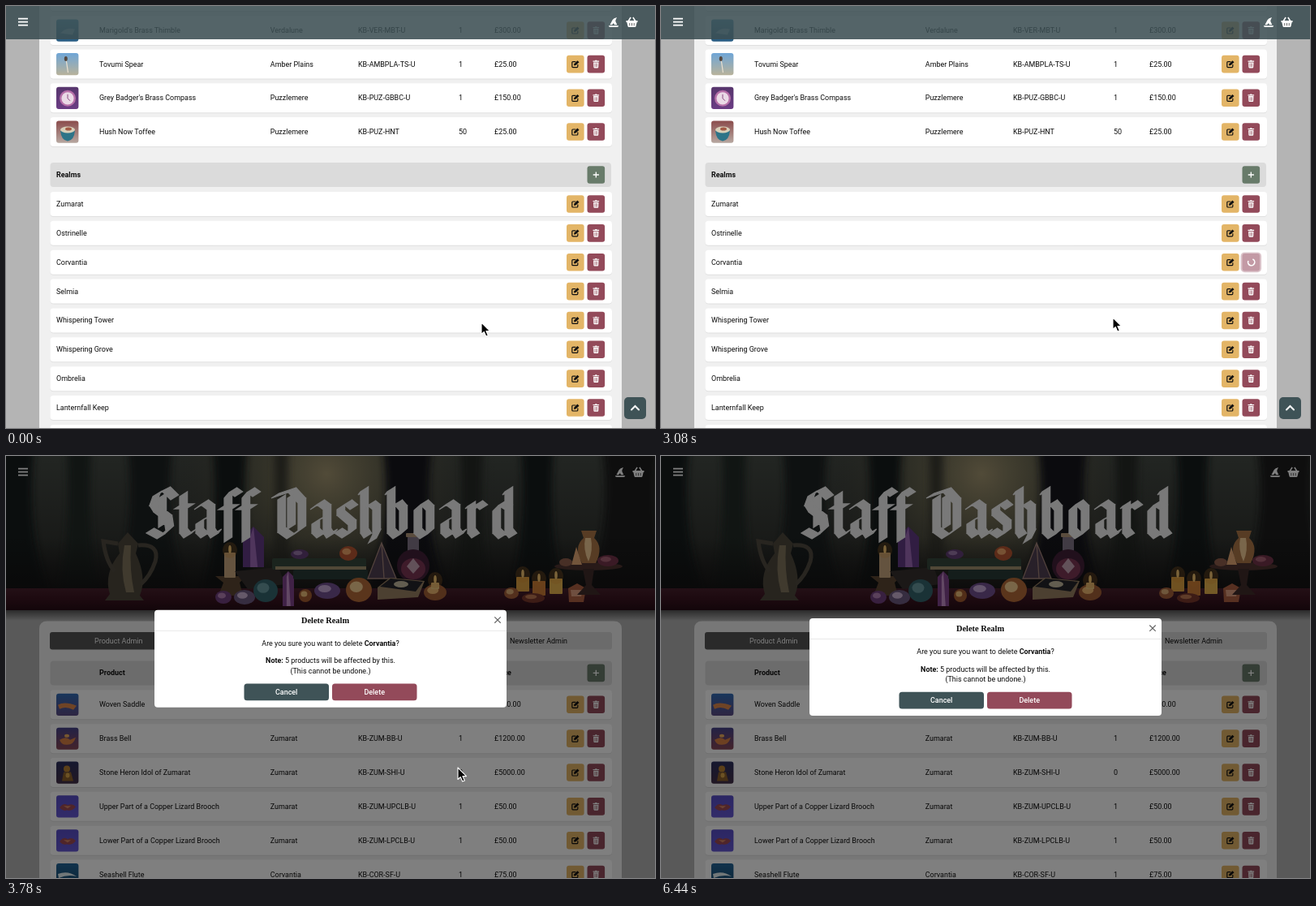
These frames come from a looping animation (800 px wide and 520 px high, 6.65 s). An HTML page:

```html
<!DOCTYPE html>
<html lang="en">
<head>
<meta charset="utf-8">
<title>Delete realm</title>
<style>
html, body { margin: 0; width: 100%; height: 100%; overflow: hidden; background: #b4b4b4; }
svg { display: block; width: 100vw; height: 100vh; }
text { font-family: Roboto, Inter, sans-serif; font-size: 8.95px; fill: #0c0c0c; }
.b { font-weight: 700; }
.m { font-weight: 500; }
.c { text-anchor: middle; }
.w { fill: #fff; }
.h { font-family: "Liberation Serif", serif; font-weight: 700; font-size: 10.4px; }
.url { font-family: Inter, sans-serif; font-size: 13px; fill: #6d727c; }
</style>
</head>
<body>
<svg id="stage" viewBox="0 0 800 520"></svg>
<script>
const LOOP = 6650, STEP = 70;
const HOVER = 1050, CLICK = 1810, RELOAD = 3430, FADE = 3446, OPEN = 3596;
const TEAL = '#3f5357', RED = '#934a5a', AMBER = '#e3b567', GREEN = '#687b6a';

// Markup helpers
const rect = (x, y, w, h, fill, r = 0, more = '') =>
  `<rect x="${x}" y="${y}" width="${w}" height="${h}" rx="${r}" fill="${fill}" ${more}/>`;
const text = (x, y, s, cls = '') => `<text x="${x}" y="${y}" class="${cls}">${s}</text>`;
const path = (d, fill, more = '') => `<path d="${d}" fill="${fill}" ${more}/>`;
const line = (d, color, w, more = '') =>
  path(d, 'none', `stroke="${color}" stroke-width="${w}" ${more}`);
const oval = (x, y, rx, ry, fill, more = '') =>
  `<ellipse cx="${x}" cy="${y}" rx="${rx}" ry="${ry}" fill="${fill}" ${more}/>`;
const group = (x, y, s, more = '') => `<g transform="translate(${x} ${y})" ${more}>${s}</g>`;

// Icons, centred on 0,0
const pen = line('M.5 -3 H-3 Q-4 -3 -4 -2 V3 Q-4 4 -3 4 H2 Q3 4 3 3 V.5', '#111', 1.2) +
  path('M-1.8 1.9 L-1.4 -.4 L2.6 -4.4 L4.7 -2.3 L.6 1.5 Z', '#111');
const bin = path('M-3.8 -4 H-1.3 L-.8 -4.8 H.8 L1.3 -4 H3.8 V-2.9 H-3.8 Z', '#fff') +
  path('M-3.2 -2.2 H3.2 L2.9 4 Q2.8 4.8 2 4.8 H-2 Q-2.8 4.8 -2.9 4 Z', '#fff') +
  line('M-1.4 -1 V3.6 M0 -1 V3.6 M1.4 -1 V3.6', RED, .6);
const plus = line('M-3.6 0 H3.6 M0 -3.6 V3.6', '#fff', 1.3);
const menu = line('M15 15.6 H27 M15 19.6 H27 M15 23.6 H27', '#fff', 1.8);
const hat = path('M-4.6 3.2 L-1.3 -3 Q0 -5 4 -6 L2.6 -3 Q2 -1.8 2.6 -.4 L4.4 3.2 L1 3.2 L0 1 L-2 3.2 Z', '#fff') +
  path('M-6.2 4.2 H6.2 Q6 6 4.5 6 H-4.5 Q-6 6 -6.2 4.2 Z', '#fff');
const basket = line('M-4.6 -1 L-1.4 -6 M4.6 -1 L1.4 -6', '#fff', 1.5) +
  path('M-7 -2 H7 V0 H6.2 L5 5 Q4.8 6 3.8 6 H-3.8 Q-4.8 6 -5 5 L-6.2 0 H-7 Z', '#fff') +
  line('M-2.7 1 V4.3 M0 1 V4.3 M2.7 1 V4.3', '#555', .9);
const bar = x => menu + group(x, 20, hat) + group(x + 22.5, 20, basket);

const button = (cx, cy, fill, icon) =>
  rect(cx - 10.8, cy - 10.8, 21.6, 21.6, fill, 3) + group(cx, cy, icon);
const tools = cy => button(701.8, cy, AMBER, pen) + button(727.3, cy, RED, bin);
const card = (cy, h) => rect(54.5, cy - h / 2 + 1, 692.5, h, '#e0e0e0', 4) +
  rect(54.5, cy - h / 2, 692.5, h, '#fff', 4);

// Thumbnails: two-tone ground with one simple shape, 27 px square
const grounds = [];
function thumb(cy, top, low, shape) {
  const id = 'th' + grounds.length;
  grounds.push(`<linearGradient id="${id}" x2="0" y2="1"><stop stop-color="${top}"/><stop offset="1" stop-color="${low}"/></linearGradient>`);
  return group(62, cy - 13.5, rect(0, 0, 27.4, 27.2, `url(#${id})`, 3) + shape);
}
const product = (cy, pic, cells) => card(cy, 36) + thumb(cy, ...pic) +
  cells.map((s, i) => text([115, 325.8, 434, 558, 602][i], cy + 3, s)).join('') + tools(cy);

const spear = line('M12 7 L14.5 24', '#e9dfcf', 1.2) + oval(11.8, 7, 2, 3, '#54473f');
const dial = oval(14, 14, 10, 10, '#b66fa8') + oval(14, 14, 7.6, 7.6, '#ead9e6') + line('M14 9 V14 L17 17', '#8a4a80', 1);
const cup = path('M5 12 H23 Q22 24 14 25 Q6 24 5 12 Z', '#2d7488') + oval(14, 11, 9, 4, '#d8cfb8') + oval(15, 10, 4, 2, '#a35b46');
const wave = path('M2 14 Q10 9 25 15 L21 20 Q12 15 4 19 Z', '#e08a4c');
const lamp = path('M4 15 Q12 10 17 15 L24 12 Q21 22 12 21 Q6 21 4 15 Z', '#db8145') + oval(13, 10, 3, 2, '#f0b060');
const idol = oval(13, 9, 4, 4, '#b98232') + path('M7 24 L9 13 H18 L21 24 Z', '#8d602b') + oval(14, 17, 2.5, 3, '#d9a648');
const brooch = path('M4 15 Q9 8 14 12 Q20 9 24 14 Q19 20 13 18 Q9 20 4 15 Z', '#a04a55') + path('M9 13 H18 L14 16 Z', '#d88665');
const shell = path('M2 13 Q14 8 25 16 Q14 13 3 18 Z', '#e6f1f4');
const gem = path('M5 17 Q12 9 23 12 L20 19 Z', '#79a9c4');

// Scrolled list
const realms = ['Zumarat', 'Ostrinelle', 'Corvantia', 'Selmia', 'Whispering Tower',
  'Whispering Grove', 'Ombrelia', 'Lanternfall Keep', 'Quenholt'];
const listPage = () => rect(0, 0, 800, 520, '#b4b4b4') + rect(41, 0, 718, 520, '#f0f0f0') +
  card(-12, 36) + tools(-12) +
  product(30, ['#4593b5', '#285a80', gem], ["Marigold's Brass Thimble", 'Verdalune', 'KB-VER-MBT-U', '1', '£300.00']) +
  product(71.6, ['#6fa5d6', '#b9b39b', spear], ['Tovumi Spear', 'Amber Plains', 'KB-AMBPLA-TS-U', '1', '£25.00']) +
  product(113.3, ['#57366d', '#6b3c84', dial], ["Grey Badger's Brass Compass", 'Puzzlemere', 'KB-PUZ-GBBC-U', '1', '£150.00']) +
  product(155, ['#8b4c4c', '#b7a8a1', cup], ['Hush Now Toffee', 'Puzzlemere', 'KB-PUZ-HNT', '50', '£25.00']) +
  rect(54.5, 193, 691.5, 30, '#dbdbdb', 4) + text(62, 211, 'Realms', 'b') +
  button(727.3, 208, GREEN, plus) +
  realms.map((s, i) => {
    const cy = 244 + i * 35.86;
    return card(cy, 30) + text(62, cy + 3, s) + tools(cy);
  }).join('') +
  rect(0, 0, 800, 41, '#3b4e52', 0, 'opacity=".87"') + bar(749) +
  rect(762, 482, 27, 27, TEAL, 5) +
  line('M771 497.5 L775.5 493 L780 497.5', '#fff', 2, 'stroke-linecap="round"') +
  `<g id="busy">${rect(714.5, 303.4, 25.6, 24.8, '#dcc5cb', 5)}${rect(716.5, 305, 21.6, 21.6, '#c39aa5', 3)}` +
  `<g id="spin">${line('M2.9 -2.9 A4.1 4.1 0 1 0 2.9 2.9', '#fff', 1.6)}</g></g>` +
  `<g id="hover">${button(727.3, 315.7, '#a86d7b', bin)}` +
  path('M0 497 H262 Q269 497 269 504 V520 H0 Z', '#dfe3ec', 'opacity=".96"') +
  text(5, 513, '...quilorby.test/desk/update_realm/...', 'url') + '</g>';

// Broad-nib lettering: each stroke is swept by a slanted pen edge
const glyphs = {
  S: ['31,54 21,44 9,50 5,61 10,69 23,79 25,92 14,102 1,95', '16,52 16,88'],
  t: ['6,50 6,95 11,101 17,96', '0,65 14,65'],
  a: ['1,66 9,60 17,66 17,95 21,101 25,96', '17,76 3,84 3,95 9,101 17,94'],
  f: ['7,106 7,52 13,45 20,50', '0,66 15,66'],
  D: ['8,54 8,94 19,102 33,92 33,58 21,45 0,52', '20,52 20,90'],
  s: ['19,66 12,60 3,66 3,73 17,85 17,95 9,101 0,95'],
  h: ['0,48 3,44 3,95 7,101', '3,69 12,61 18,66 18,97 13,107'],
  b: ['0,48 3,44 3,95 10,102 18,95 18,67 12,60 3,69'],
  o: ['3,67 3,95 10,102 18,95 18,67 11,60 3,67'],
  r: ['0,65 3,62 3,95 8,101', '3,71 12,61 18,66'],
  d: ['15,48 18,44 18,95 23,101', '18,66 10,61 3,68 3,95 10,102 18,94']
};
function letter(ch, x) {
  const nx = 9.6, ny = -6;
  let d = '';
  for (const stroke of glyphs[ch]) {
    const pts = stroke.split(' ').map(p => p.split(',').map(Number));
    for (let i = 1; i < pts.length; i++) {
      let [a, b] = [pts[i - 1], pts[i]];
      if ((b[0] - a[0]) * ny - (b[1] - a[1]) * nx < 0) [a, b] = [b, a];
      d += `M${a}L${b}L${[b[0] + nx, b[1] + ny]}L${[a[0] + nx, a[1] + ny]}Z`;
    }
  }
  return group(x, 0, path(d, '#f3f3f3', 'stroke="#f3f3f3" stroke-width="1.3"'));
}
function heading() {
  const xs = [172, 208, 231, 262, 284, 0, 327, 374, 405, 434, 467, 500, 533, 566, 597];
  const s = 'Staff Dashboard';
  return `<g role="img" aria-label="${s}">` +
    xs.map((x, i) => s[i] === ' ' ? '' : letter(s[i], x)).join('') + '</g>';
}

// Soft still life behind the heading
function hero() {
  const trunk = (x, w, c) => path(`M${x} -10 H${x + w} Q${x + w * .8} 90 ${x + w * 1.3} 165 H${x - w * .3} Q${x + w * .2} 90 ${x} -10 Z`, c);
  const crystal = (x, top, w, base, c, lit) =>
    path(`M${x - w} ${base} V${top + w} L${x} ${top} L${x + w} ${top + w} V${base} Z`, c) +
    path(`M${x - w * .3} ${base} V${top + w} L${x} ${top} L${x + w * .4} ${base} Z`, lit);
  const candle = (x, top, w, base, c) => rect(x - w, top, 2 * w, base - top, c, 1) +
    oval(x, top - 4, 1.8, 5, '#ffdc8a') + oval(x, top - 3, 9, 10, '#e08a30', 'opacity=".25"');
  const ball = (x, y, rx, ry, c, lit) => oval(x, y, rx, ry, c) + oval(x - rx * .2, y - ry * .25, rx * .5, ry * .45, lit);
  return rect(0, 0, 800, 190, 'url(#wood)') + rect(0, 0, 800, 190, 'url(#glow)') +
    '<g filter="url(#soft)">' +
    [[-20, 55, '#151a1b'], [75, 30, '#232927'], [150, 55, '#1d2221'], [255, 42, '#171b1b'],
     [330, 18, '#3b3a30'], [465, 60, '#15191a'], [560, 28, '#252a28'], [635, 40, '#161a1b'], [735, 70, '#1a1e1f']]
      .map(a => trunk(...a)).join('') + '</g>' +
    rect(0, 100, 800, 64, 'url(#dusk)') + rect(0, 163, 800, 27, 'url(#table)') +
    // jug
    path('M138 108 L150 94 L163 108 L160 120 Q174 150 165 172 L170 178 H122 L128 170 Q120 145 140 120 Z', '#4e483d') +
    path('M146 110 H154 Q152 140 158 168 H148 Q140 140 146 110 Z', '#80755c') +
    line('M163 110 Q190 108 184 130 Q178 148 166 158 M138 108 L120 105 Q123 130 134 142', '#514b40', 5) +
    // left group
    path('M258 148 H296 L288 156 L292 172 H262 L268 156 Z', '#5d4632') + candle(276, 119, 7, 150, '#c9a87f') +
    crystal(305, 87, 13, 137, '#633b86', '#a06bba') + path('M282 142 L336 137 L344 158 L298 164 Z', '#37302e') +
    ball(268, 174, 10, 8, '#70407e', '#b581b5') + ball(294, 174, 13, 9, '#6d5a82', '#cbb4d3') +
    ball(320, 166, 15, 14, '#34646c', '#6899a0') + crystal(348, 142, 7, 185, '#82448d', '#c592ca') +
    ball(369, 172, 8, 8, '#a65d31', '#efc27b') + ball(396, 166, 16, 10, '#735091', '#c7a9d8') +
    // books
    rect(328, 126, 116, 14, '#36483d', 2) + rect(332, 136, 112, 4, '#a2916e') + rect(354, 140, 92, 12, '#283a37', 2) +
    ball(362, 121, 11, 6, '#633f77', '#9c79ac') + ball(422, 120, 11, 9, '#b95732', '#efa668') +
    ball(435, 165, 16, 15, '#b66b38', '#f4cd91') +
    path('M463 107 L446 151 H481 Z', '#514052') + line('M463 107 L446 151 H481 Z M463 107 L466 151', '#a28379', 1.3) +
    // bottle
    rect(495, 99, 14, 20, '#83768a', 2) + oval(502, 135, 20, 20, '#422138') + oval(502, 139, 15, 13, '#7c3655') +
    path('M502 126 L510 136 L502 145 L494 136 Z', '#c5a3b4') + rect(493, 95, 18, 5, '#b59a7c', 1) +
    path('M458 162 L473 150 L516 154 L508 174 L458 177 Z', '#9a8162') + path('M461 161 L474 151 L514 155 L505 167 Z', '#25252b') +
    oval(487, 158, 9, 4, '#c6bca1') + ball(529, 168, 14, 10, '#a66137', '#efb970') + candle(529, 156, 5, 164, '#f0c980') +
    // right group
    candle(637, 149, 8, 167, '#e0a342') + candle(657, 154, 8, 172, '#cf7f37') + candle(678, 151, 8, 170, '#eab64e') +
    ball(623, 169, 9, 7, '#a7613b', '#dfb077') + ball(650, 175, 14, 6, '#7a392d', '#c07852') +
    path('M693 163 L704 157 L715 163 L712 180 H694 Z', '#b06142') + path('M696 165 H711 L709 173 H697 Z', '#e0a080') +
    oval(718, 136, 42, 5, '#503531') + path('M711 139 H725 L722 159 L733 171 H704 L715 159 Z', '#412c2b') +
    path('M709 92 H728 L725 101 Q737 112 727 132 H710 Q699 112 712 101 Z', '#b07849') +
    path('M714 101 H721 Q724 116 718 130 Q711 115 714 101 Z', '#f3cd97') + ball(742, 129, 13, 7, '#75354b', '#aa6275') +
    path('M697 134 L703 112 L710 134 Z', '#e8ab76') + oval(690, 131, 8, 5, '#925f4c');
}

// Top of the page
const tab = (x, x2, s, on) => rect(x, 217, x2 - x, 21.5, on ? '#555' : '#d8d8d8', 3) +
  text((x + x2) / 2, 231, s, 'c' + (on ? ' w' : ''));
const topPage = () => rect(0, 0, 800, 520, '#b4b4b4') + rect(0, 188, 800, 15, 'url(#drop)') + hero() + bar(757) + heading() +
  path('M41 520 V213 Q41 203.500 51 203.500 H749 Q759 203.500 759 213 V520 Z', '#f0f0f0') +
  tab(54, 223.5, 'Product Admin', true) + tab(228, 383, 'FAQ Admin') +
  tab(387, 562, 'Message Admin') + tab(566, 747, 'Newsletter Admin') +
  rect(54.5, 252.500, 692.5, 30, '#dadada', 4) +
  [['115', 'Product'], ['325.8', 'Realm'], ['434', 'SKU'], ['558', 'Stock'], ['602', 'Price']]
    .map(([x, s]) => text(x, 270.4, s, 'b')).join('') + button(727.3, 267.4, GREEN, plus) +
  [
    [['#326db8', '#5c4b86', wave], ['Woven Saddle', 'Zumarat', 'KB-ZUM-WS-U', '0', '£500.00']],
    [['#45438c', '#8a4856', lamp], ['Brass Bell', 'Zumarat', 'KB-ZUM-BB-U', '1', '£1200.00']],
    [['#2c305f', '#443048', idol], ['Stone Heron Idol of Zumarat', 'Zumarat', 'KB-ZUM-SHI-U', '0', '£5000.00']],
    [['#574dc8', '#6558d5', brooch], ['Upper Part of a Copper Lizard Brooch', 'Zumarat', 'KB-ZUM-UPCLB-U', '1', '£50.00']],
    [['#574dc8', '#6558d5', brooch], ['Lower Part of a Copper Lizard Brooch', 'Zumarat', 'KB-ZUM-LPCLB-U', '1', '£50.00']],
    [['#23659a', '#194c6d', shell], ['Seashell Flute', 'Corvantia', 'KB-COR-SF-U', '1', '£75.00']]
  ].map(([pic, cells], i) => product(306.3 + i * 41.85, pic, cells)).join('');

const dialog = () => rect(183, 200, 434, 120, '#fff', 4) +
  line('M183 225.500 H617', '#e4e4e4', .8) + text(393.5, 216.2, 'Delete Realm', 'h c') +
  line('M602.3 208.500 L609.700 215.900 M609.700 208.500 L602.3 215.900', '#666', 1.2) +
  text(400, 243.7, 'Are you sure you want to delete <tspan class="b">Corvantia</tspan>?', 'c') +
  text(400, 265.5, '<tspan class="b">Note:</tspan> 5 products will be affected by this.', 'c') +
  text(400, 278.4, '(This cannot be undone.)', 'c') +
  rect(293.5, 290.700, 104.5, 20.800, TEAL, 3.5) + text(345.7, 304.2, 'Cancel', 'c m w') +
  rect(402, 290.700, 104.5, 20.800, RED, 3.5) + text(454.2, 304.2, 'Delete', 'c m w');

const arrow = path('M0 0 V14.500 L3.300 11.500 L5.700 17 L8.300 15.900 L5.900 10.600 H10.500 Z', '#000',
  'stroke="#fff" stroke-width="1.1" stroke-linejoin="round"');
const hand = path('M-1.500 0 Q0 -2.300 1.500 0 V5 Q3 3.800 4.200 5.400 Q5.800 4.400 7 6.200 Q9.200 5.400 9.800 7.800 V11 Q9.800 13 8.600 14.500 V17 H.500 V15 Q-2 12 -4.500 9 Q-4.800 6.800 -2.500 7.500 L-1.500 8.700 Z',
  '#fff', 'stroke="#000" stroke-width="1.1" stroke-linejoin="round"') + line('M2.300 10 V14 M4.500 10 V14 M6.700 10 V14', '#000', .7);

const stop = (o, c, a = 1) => `<stop offset="${o}" stop-color="${c}" stop-opacity="${a}"/>`;
const down = (id, ...s) => `<linearGradient id="${id}" x2="0" y2="1">${s.join('')}</linearGradient>`;
const pages = `<g id="list">${listPage()}</g><g id="top">${topPage()}</g>`;
const stage = document.getElementById('stage');
stage.innerHTML = '<defs>' + grounds.join('') +
  down('wood', stop(0, '#454b45'), stop(1, '#232321')) +
  down('dusk', stop(0, '#121313', 0), stop(1, '#121011', .8)) +
  down('table', stop(0, '#48202c'), stop(.5, '#3a1420'), stop(1, '#250c14')) +
  down('drop', stop(0, '#000', .6), stop(1, '#000', 0)) +
  `<radialGradient id="glow" gradientUnits="userSpaceOnUse" cx="395" cy="22" r="210">${stop(0, '#aa9c74', .95)}${stop(.4, '#706c53', .65)}${stop(1, '#333', 0)}</radialGradient>` +
  '<filter id="soft"><feGaussianBlur stdDeviation="5"/></filter></defs>' + pages +
  rect(0, 0, 800, 520, '#000', 0, 'id="shade"') + `<g id="dialog">${dialog()}</g>` +
  `<g id="cursor"><g id="arrow">${arrow}</g><g id="hand">${hand}</g></g>`;

const part = {};
stage.querySelectorAll('g[id], rect[id]').forEach(n => part[n.id] = n);
const show = (id, on) => part[id].setAttribute('display', on ? 'inline' : 'none');
const move = (id, x, y, turn = 0) => part[id].setAttribute('transform', `translate(${x} ${y}) rotate(${turn})`);
const clamp = v => Math.max(0, Math.min(1, v));
const smooth = v => v * v * (3 - 2 * v);

// Cubic ease-out, cubic-bezier(0, 0, .58, 1)
function easeOut(x) {
  let lo = 0, hi = 1;
  for (let i = 0; i < 20; i++) {
    const u = (lo + hi) / 2;
    if (3 * .58 * u * u * (1 - u) + u ** 3 < x) lo = u; else hi = u;
  }
  return smooth(lo);
}

const moves = [
  [350, 1120, 727, 316, smooth],
  [1890, 2660, 557, 384, smooth],
  [4340, 4900, 314, 522, v => v]
];
function pointer(t) {
  let x = 586, y = 390;
  for (const [from, to, nx, ny, ease] of moves) {
    const k = ease(clamp((t - from) / (to - from)));
    x += (nx - x) * k;
    y += (ny - y) * k;
  }
  return [x, y];
}

function draw(t) {
  const over = t >= HOVER && t < CLICK;
  show('list', t < RELOAD);
  show('top', t >= RELOAD);
  show('hover', over);
  show('busy', t >= CLICK);
  move('spin', 727.7, 315.7, (t - CLICK) / 750 * 360);
  part.shade.setAttribute('opacity', .5 * clamp((t - FADE) / 150));
  part.dialog.setAttribute('opacity', clamp((t - OPEN) / 150));
  move('dialog', 0, -50 * (1 - easeOut(clamp((t - OPEN) / 300))));
  move('cursor', ...pointer(t));
  show('cursor', t < 4900);
  show('arrow', !over);
  show('hand', over);
}

const start = performance.now();
function tick() {
  const t = (performance.now() - start) % LOOP;
  draw(Math.floor((t + 4) / STEP) * STEP % LOOP);
  requestAnimationFrame(tick);
}
draw(0);
requestAnimationFrame(tick);
</script>
</body>
</html>
```
